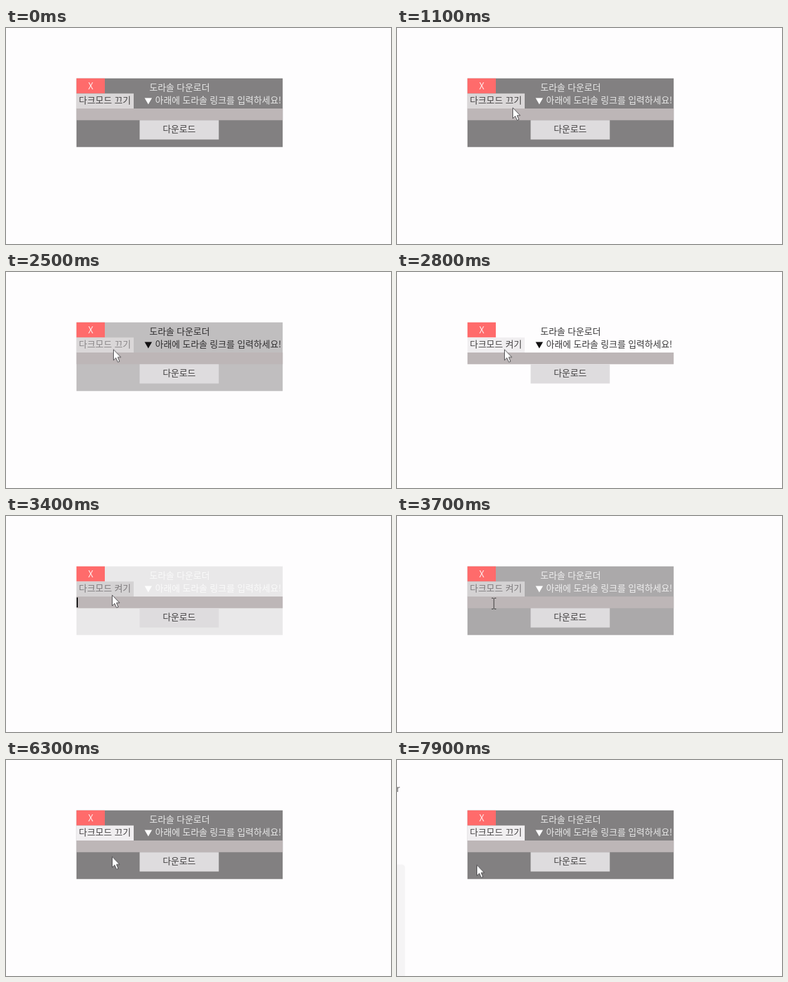
Recreate the animation shown at these times as an HTML page. Size 600 by 338 pixels, loop 8000 ms.

```html
<!DOCTYPE html>
<html lang="ko">
<head>
<meta charset="utf-8">
<style>
html, body { margin: 0; width: 100%; height: 100%; overflow: hidden; background: #fefdfe; }
svg { display: block; width: 600px; height: 338px; }
text { font: 14px "Noto Sans CJK KR", "Noto Sans CJK", sans-serif; }
.heading text { fill-opacity: .84; }

/* 8 s loop: 1.25% is one 100 ms tick */
.panel, .heading, .toggle, .label, .off, .on, .caret, .arrow, .beam, .page {
  animation: 8s step-end infinite;
}
.panel { animation-name: panel; }
.heading { animation-name: heading; }
.toggle { animation-name: toggle; }
.label { animation-name: label; }
.off { animation-name: off; }
.on { animation-name: on; }
.caret { animation-name: caret; }
.arrow { animation-name: arrow; }
.beam { animation-name: beam; }
.page { animation-name: page; }

@keyframes panel {
  0% { opacity: 1; }
  27.5% { opacity: 1; animation-timing-function: steps(6); }
  35% { opacity: 0; }
  41.25% { opacity: 0; animation-timing-function: steps(6); }
  48.75%, 100% { opacity: 1; }
}
@keyframes heading {
  0%, 41.25%, 100% { fill: #fdfdfd; }
  27.5% { fill: #121112; }
}
@keyframes toggle {
  0% { fill: #dad7d8; }
  35% { fill: #f0eef0; }
  36.25% { fill: #f0eef0; animation-timing-function: steps(3); }
  40% { fill: #d4d2d3; }
  48.75%, 100% { fill: #f0eef0; }
}
@keyframes label {
  0% { fill: #484647; }
  21.25% { fill: #484647; animation-timing-function: steps(3); }
  25% { fill: #8a8789; }
  35% { fill: #484647; }
  36.25% { fill: #484647; animation-timing-function: steps(3); }
  40% { fill: #7f7c7e; }
  48.75%, 100% { fill: #484647; }
}
@keyframes off {
  0%, 48.75%, 100% { opacity: 1; }
  35% { opacity: 0; }
}
@keyframes on {
  0%, 48.75%, 100% { opacity: 0; }
  35% { opacity: 1; }
}
@keyframes caret {
  0%, 31.25%, 45%, 67.5%, 78.75%, 90%, 100% { opacity: 0; }
  25%, 38.75%, 58.75%, 71.25%, 83.75% { opacity: 1; }
}
@keyframes arrow {
  0% { opacity: 0; transform: translate(132px, 280px); }
  3.75% { opacity: 1; transform: translate(132px, 280px); }
  5% { opacity: 1; transform: translate(170px, 190px); }
  6.25% { opacity: 1; transform: translate(235px, 88px); }
  7.5% { opacity: 1; transform: translate(331px, 125px); }
  10% { opacity: 1; transform: translate(300px, 119px); }
  11.25% { opacity: 1; transform: translate(262px, 120px); }
  12.5% { opacity: 1; transform: translate(215px, 122px); }
  13.75% { opacity: 1; transform: translate(180px, 124px); }
  15% { opacity: 1; transform: translate(167px, 125px); }
  17.5% { opacity: 1; transform: translate(163px, 124px); }
  20% { opacity: 1; transform: translate(167px, 123px); }
  22.5% { opacity: 1; transform: translate(167px, 120.5px); }
  42.5% { opacity: 1; transform: translate(165px, 123px); }
  43.75% { opacity: 1; transform: translate(160px, 125px); }
  45% { opacity: 0; transform: translate(151px, 137px); }
  50% { opacity: 1; transform: translate(205px, 155px); }
  51.25% { opacity: 1; transform: translate(266px, 166px); }
  52.5% { opacity: 1; transform: translate(225px, 140px); }
  53.75% { opacity: 1; transform: translate(160px, 105px); }
  55% { opacity: 1; transform: translate(90px, 87px); }
  56.25% { opacity: 0; transform: translate(90px, 87px); }
  73.75% { opacity: 1; transform: translate(182px, 240px); }
  75% { opacity: 1; transform: translate(181px, 215px); }
  76.25% { opacity: 1; transform: translate(175px, 185px); }
  77.5% { opacity: 1; transform: translate(168px, 160px); }
  78.75% { opacity: 1; transform: translate(165px, 150.5px); }
  80% { opacity: 1; transform: translate(150px, 135px); }
  81.25% { opacity: 1; transform: translate(130px, 112px); }
  82.5% { opacity: 1; transform: translate(112px, 92px); }
  83.75% { opacity: 0; transform: translate(112px, 92px); }
  96.25% { opacity: 1; transform: translate(106px, 196px); }
  97.5% { opacity: 1; transform: translate(118px, 172px); }
  98.75%, 100% { opacity: 1; transform: translate(124px, 163.5px); }
}
@keyframes beam {
  0%, 50%, 100% { opacity: 0; }
  45% { opacity: 1; }
}
@keyframes page {
  0% { opacity: 0; }
  93.75%, 100% { opacity: 1; }
}
</style>
</head>
<body>
<svg viewBox="0 0 600 338">
  <g class="page">
    <rect x="-12" y="163.5" width="24.5" height="190" rx="5" fill="#f5f4f5"/>
    <text x="-1" y="50" fill="#666">r</text>
  </g>

  <rect class="panel" x="109.8" y="78.8" width="321.4" height="107.5" fill="#828081"/>
  <rect x="109.8" y="78.8" width="44.2" height="23.7" fill="#ff6b6b"/>
  <text x="132" y="95.5" text-anchor="middle" fill="#fff" fill-opacity=".85">X</text>
  <g class="heading">
    <text x="223.5" y="98">도라솔 다운로더</text>
    <path d="M216 109.5h11.5l-5.75 10z"/>
    <text x="232.5" y="118">아래에 도라솔 링크를 입력하세요!</text>
  </g>

  <rect class="toggle" x="109.8" y="102.5" width="89.2" height="24"/>
  <g class="label">
    <text class="off" x="113.5" y="118">다크모드 끄기</text>
    <text class="on" x="113.5" y="118">다크모드 켜기</text>
  </g>

  <rect x="109.8" y="126" width="321.4" height="18.3" fill="#bdb6b7"/>
  <rect class="caret" x="110" y="127.5" width="2" height="15.5" fill="#111"/>
  <rect x="208.3" y="144.3" width="123.3" height="30.2" fill="#dedcde"/>
  <text x="270" y="163" text-anchor="middle" fill="#434142">다운로드</text>

  <path class="beam" d="M147.5 128.5h2.5l1 1 1-1h2.5M151 129.5v15M147.5 145.5h2.5l1-1 1 1h2.5" fill="none" stroke="#333"/>
  <path class="arrow" d="M.5 .8V17.5l3.8-3.6 3 6.6 2.7-1.2-2.9-6.4h5z" fill="#fff" stroke="#4a494c"/>
</svg>
</body>
</html>
```
